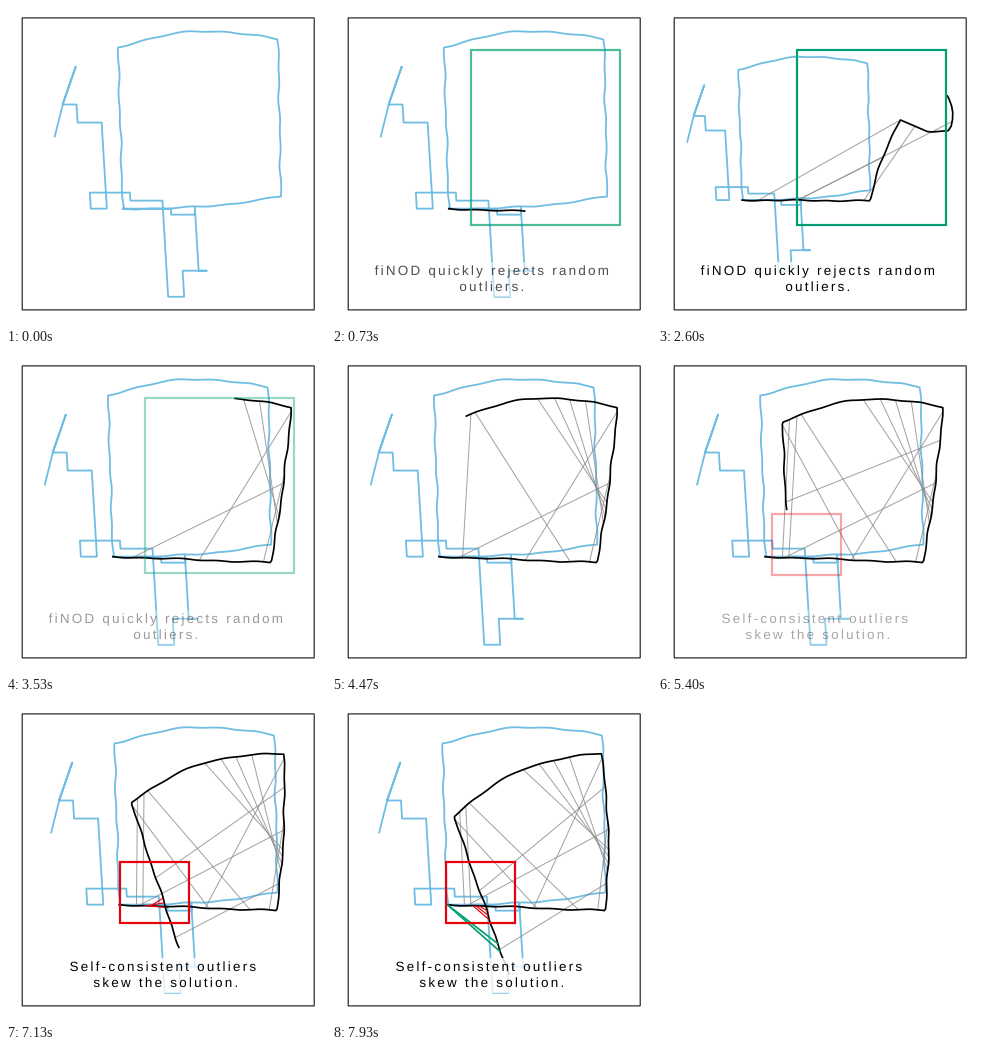
A matplotlib script for the animation above (8 s loop, 320 by 320 pixels).

```python
import numpy as np
import matplotlib.pyplot as plt
from matplotlib.animation import FuncAnimation
from matplotlib.collections import LineCollection
from matplotlib.patches import PathPatch, Rectangle
from matplotlib.path import Path
from matplotlib.textpath import TextPath

SIZE, DPI = 320, 100
LOOP, FRAMES = 8000, 160
STEP = 1000 / 15            # the motion advances 15 times a second
PX = 72 / DPI
SKY, GREEN, RED, GRAY = "#6fbde3", "#029e73", "#e8000b", "#8a8a8a"

U = np.arange(0, 661, 3.0)  # arc position of each pose
SIDES = (0, 160, 315, 475, 660)


def wobble(u, size):
    """Smooth wander that is zero at the start."""
    x = np.sin(u / 5.3) + np.sin(u / 11)
    y = np.sin(u / 6.1) + np.sin(u / 14)
    return size * np.column_stack([x, y])


def bowed(u, corners, stops, bows):
    """Polyline through corners, each side bowed outwards by an arch."""
    corners = np.array(corners, float)
    side = np.clip(np.searchsorted(stops, u, "right") - 1, 0, len(stops) - 2)
    stops = np.array(stops, float)
    s = (u - stops[side]) / (stops[side + 1] - stops[side])
    d = corners[side + 1] - corners[side]
    normal = np.column_stack([-d[:, 1], d[:, 0]]) / np.hypot(*d.T)[:, None]
    arch = np.array(bows)[side] * np.sin(np.pi * s)
    return corners[side] + d * s[:, None] + normal * arch[:, None]


def walk(start, moves, lean=0.06):
    """Turtle walk; vertical moves lean a little to one side."""
    heading = {"E": (1, 0), "W": (-1, 0), "N": (-lean, -1), "S": (lean, 1)}
    points = [np.array(start, float)]
    for move in moves.split():
        points.append(points[-1] + np.array(heading[move[0]]) * int(move[1:]))
    return points


# reference trajectory: a loop, a staircase walk and a slanted stroke
loop_u = np.linspace(0, 640, 129)
START = (117, 202)
loop = bowed(loop_u, [START, (275, 190), (272, 33), (112, 41), START],
             (0, 160, 320, 480, 640), (4, 0, 12, 0)) + wobble(loop_u, 0.5)
stairs = walk(START, "E48 S6 E24 N8 S64 E8 W24 S26 W16 N96 W32 N8 "
                     "W40 S16 E16 N86 W24 N18 W14")
TRUTH = np.vstack([loop, stairs, [(70, 60), (57, 98), (49, 130)]])


def estimate_shape(corners, stops=SIDES, bows=(0, 2, 15, 0)):
    return bowed(U, [START] + corners, stops, bows) + wobble(U, 0.45)


SQUARE = estimate_shape([(275, 208), (295, 53), (134, 65), (138, 248)])
SKEWED = estimate_shape([(274, 208), (290, 52), (133, 88), (188, 262)])
FOLDED = estimate_shape([(275, 208), (270, 51), (123, 115), (182, 284)],
                        bows=(0, 5, 16, 0))
BENT = estimate_shape([(275, 203), (312, 103), (349, 119), (374, 116), (367, 66)],
                      (0, 160, 240, 256, 268, 286), (0, -4, 0, 0, 6))

POSES = [(0, SQUARE), (2267, SQUARE), (2600, BENT), (2667, BENT), (2867, SQUARE),
         (5333, SQUARE), (6000, SKEWED), (6400, SKEWED), (7933, FOLDED)]
POSE_T = [t for t, _ in POSES]

# progress of the path head, with two short rests
HEAD_T = [0, 1667, 5400, 6000, 6067, 6267, 6400, 7933]
HEAD_U = [0, 190, 564, 609, 609, 617, 617, 648]


def fan(a, b, n, delay=0, until=np.inf):
    """n links from span a to span b: (from, to, shown at, dropped at)."""
    return [(p, q, max(p, q) + delay, until)
            for p, q in zip(np.linspace(*a, n), np.linspace(*b, n))]


OUTLIERS = (fan((19, 87), (240, 311), 2)
            + fan((70, 70), (203, 272), 2, until=290)
            + fan((152, 152), (248, 248), 1)
            + fan((346, 392), (200, 220), 4)
            + fan((455, 478), (133, 91), 2)
            + fan((459, 467), (24, 17), 2)
            + fan((556, 620), (283, 187), 2))
FALSE_LINKS = fan((32, 26), (578, 588), 3, delay=35)
TRUE_LINKS = fan((0, 0), (614, 622), 2, delay=22)

FONT = {"family": "Liberation Sans"}
FONT_SIZE, TRACKING = 13.4, 2.25


def glyphs(text):
    return TextPath((0, 0), text, size=FONT_SIZE, prop=FONT)


def advance(ch):
    return glyphs(ch + "|").vertices[:, 0].max() - glyphs("|").vertices[:, 0].max()


def spaced_line(text, cx, base):
    """Letter-spaced line centred on cx, as one path in stage pixels."""
    widths = [advance(c) for c in text]
    x = cx - (sum(widths) + TRACKING * (len(text) - 1)) / 2
    parts = []
    for ch, w in zip(text, widths):
        if ch != " ":
            glyph = glyphs(ch)
            parts.append(Path(glyph.vertices * (1, -1) + (x, base), glyph.codes))
        x += w + TRACKING
    return Path.make_compound_path(*parts)


fig = plt.figure(figsize=(SIZE / DPI, SIZE / DPI), dpi=DPI, facecolor="white")
ax = fig.add_axes([0, 0, 1, 1])
ax.set_xlim(0, SIZE)
ax.set_ylim(SIZE, 0)
ax.axis("off")

ax.add_patch(Rectangle((16.2, 11.9), 292, 292, fill=False, ec="#111111",
                       lw=1.1 * PX, snap=False, zorder=9))
truth, = ax.plot([], [], color=SKY, lw=1.8 * PX, zorder=1)
estimate, = ax.plot([], [], color="black", lw=1.7 * PX, zorder=3)


def link_layer(color, width, alpha, z):
    layer = LineCollection([], colors=color, linewidths=width * PX, alpha=alpha, zorder=z)
    ax.add_collection(layer)
    return layer


LAYERS = [(link_layer(GRAY, 1.0, 0.8, 2), OUTLIERS),
          (link_layer(RED, 1.2, 1, 4), FALSE_LINKS),
          (link_layer(GREEN, 1.7, 1, 4), TRUE_LINKS)]


def caption(lines, box, color):
    """Frame, translucent backing and text that fade together."""
    x0, y0, x1, y1 = box
    frame = Rectangle((x0, y0), x1 - x0, y1 - y0, fill=False, ec=color,
                      lw=2.2 * PX, zorder=6)
    back = Rectangle((38, 256), 245, 35, fc="white", lw=0, zorder=7)
    items = [(frame, 1), (back, 0.8)]
    for i, line in enumerate(lines):
        path = spaced_line(line, 159.8, 269 + 16 * i)
        items.append((PathPatch(path, fc="black", lw=0, zorder=8), 1))
    for patch, _ in items:
        ax.add_patch(patch)
    return items


CAPTIONS = [
    (caption(["fiNOD quickly rejects random", "outliers."],
             (139, 44, 287.5, 219), GREEN), [200, 867, 3067, 3733], [0, 1, 1, 0]),
    (caption(["Self-consistent outliers ", "skew the solution."],
             (113.5, 160, 182.5, 221), RED), [5167, 5833], [0, 1]),
]


def pose_at(t):
    i = np.clip(np.searchsorted(POSE_T, t, "right") - 1, 0, len(POSES) - 2)
    (t0, a), (t1, b) = POSES[i], POSES[i + 1]
    return a + (b - a) * np.clip((t - t0) / (t1 - t0), 0, 1)


def draw(n):
    t = int(n * LOOP / FRAMES / STEP + 0.05) * STEP
    head = np.interp(t, HEAD_T, HEAD_U)
    pose = pose_at(t)

    def at(u):
        return np.array([np.interp(u, U, axis) for axis in pose.T])

    path = np.vstack([pose[U < head], at(head)])

    # camera: fit everything drawn so far, centred in the frame
    every = np.vstack([TRUTH, path])
    lo, hi = every.min(axis=0), every.max(axis=0)
    scale = 265.5 / max(hi - lo)

    def view(p):
        return (p - (lo + hi) / 2) * scale + (162, 158)

    truth.set_data(*view(TRUTH).T)
    estimate.set_data(*view(path).T)
    estimate.set_visible(head > 0)
    for layer, links in LAYERS:
        layer.set_segments([view(np.array([at(a), at(b)]))
                            for a, b, start, stop in links if start <= head < stop])
    for items, times, levels in CAPTIONS:
        level = np.interp(t, times, levels)
        for patch, alpha in items:
            patch.set_alpha(alpha * level)
            patch.set_visible(level > 0)
    return []


anim = FuncAnimation(fig, draw, frames=FRAMES, interval=LOOP / FRAMES, repeat=True,
                     repeat_delay=0, init_func=lambda: draw(0), blit=False)
plt.show()
```
